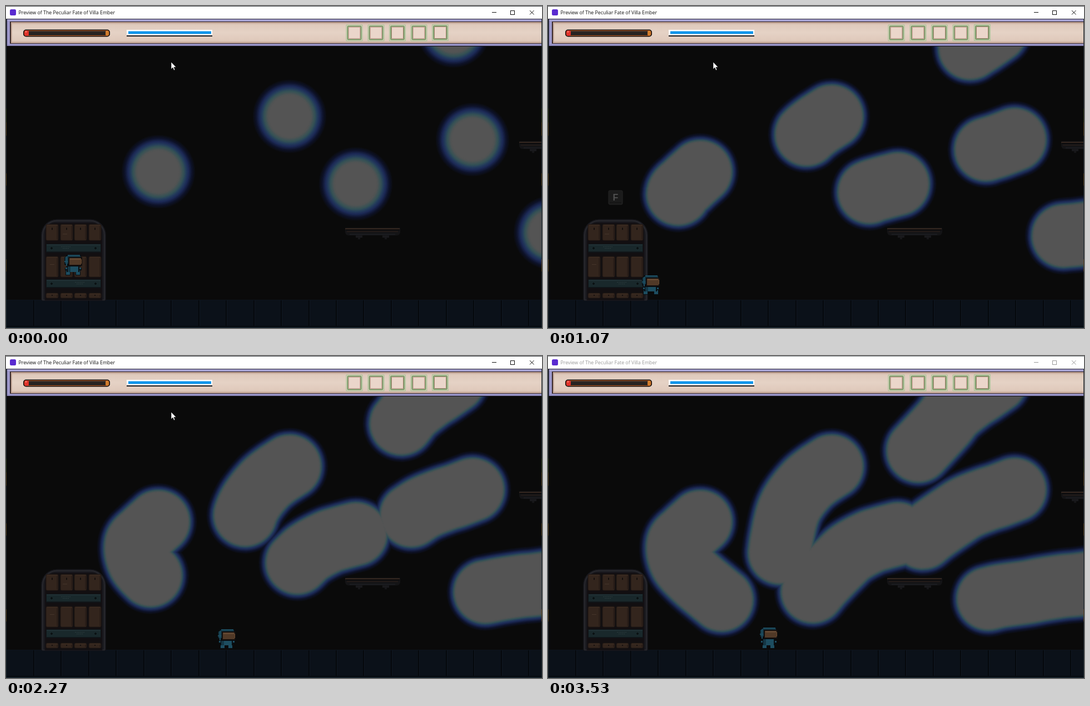
These frames come from a looping animation (964x581 px, 3600 ms). An HTML page with a canvas:

```html
<!DOCTYPE html>
<html lang="en">
<head>
<meta charset="utf-8">
<title>Game preview</title>
<style>
  html, body { margin: 0; width: 100%; height: 100%; overflow: hidden; background: #0a0a0a; }
  canvas { display: block; }
</style>
</head>
<body>
<canvas id="stage" width="964" height="581"></canvas>
<script>
const W = 964, H = 581, LOOP = 3600, STEPS = 54;
const stage = document.getElementById('stage');
let ctx = stage.getContext('2d');

const clamp = (v, lo = 0, hi = 1) => Math.min(hi, Math.max(lo, v));
const mix = (a, b, k) => a + (b - a) * k;

function rect(x, y, w, h, color) {
  ctx.fillStyle = color;
  ctx.fillRect(x, y, w, h);
}

function box(x, y, w, h, radius, fill, line, width = 1) {
  ctx.beginPath();
  ctx.roundRect(x, y, w, h, radius);
  ctx.fillStyle = fill;
  ctx.fill();
  if (!line) return;
  ctx.strokeStyle = line;
  ctx.lineWidth = width;
  ctx.stroke();
}

// ---- Glowing trails ----
const times = [0, 600, 1070, 1730, 2270, 3130, 3530];
const trails = [
  [[274, 299], [250, 321], [234, 339], [239, 371], [260, 396], [296, 427], [312, 440]],
  [[510, 199], [484, 216], [465, 232], [442, 261], [430, 287], [420, 333], [417, 355]],
  [[629, 321], [599, 329], [578, 336], [545, 354], [524, 373], [491, 407], [476, 425]],
  [[839, 241], [810, 252], [788, 259], [753, 273], [729, 288], [690, 315], [674, 328]],
  [[805, 45], [779, 63], [759, 76], [729, 100], [711, 122], [679, 157], [666, 171]],
  [[979, 409], [949, 413], [927, 415], [888, 421], [862, 426], [813, 433], [792, 438]]
];

// Each stop: radius when fresh, radius when saturated, colour.
const glow = [
  [68, 71, [10, 10, 10]],
  [61, 66, [14, 19, 42]],
  [55, 62, [28, 41, 86]],
  [50, 59, [37, 62, 92]],
  [46, 57, [52, 81, 85]],
  [40, 54, [80, 84, 84]],
  [37, 52, [84, 84, 84]]
];

function velocity(p, i, axis) {
  const a = Math.max(i - 1, 0), b = Math.min(i + 1, p.length - 1);
  return (p[b][axis] - p[a][axis]) / (times[b] - times[a]);
}

function along(p, t) {
  let i = 0;
  while (i < times.length - 2 && t > times[i + 1]) i++;
  const span = times[i + 1] - times[i];
  const u = clamp((t - times[i]) / span), u2 = u * u, u3 = u2 * u;
  return [0, 1].map(axis =>
    (2 * u3 - 3 * u2 + 1) * p[i][axis] + (3 * u2 - 2 * u3) * p[i + 1][axis] +
    span * ((u3 - 2 * u2 + u) * velocity(p, i, axis) + (u3 - u2) * velocity(p, i + 1, axis)));
}

function trailPath(t) {
  const path = new Path2D();
  for (const p of trails) {
    path.moveTo(p[0][0] + 0.02, p[0][1]);
    for (let s = 0; s < t; s += 60) path.lineTo(...along(p, s));
    path.lineTo(...along(p, t));
  }
  return path;
}

function drawTrails(t) {
  const path = trailPath(t), settled = 1 - Math.exp(-t / 130);
  ctx.save();
  ctx.beginPath();
  ctx.rect(1, 73, W - 2, 457);
  ctx.clip();
  ctx.lineCap = ctx.lineJoin = 'round';
  for (let i = 0; i < glow.length - 1; i++) {
    const [freshA, fullA, colorA] = glow[i], [freshB, fullB, colorB] = glow[i + 1];
    for (let k = 0.2; k < 1.01; k += 0.2) {
      ctx.lineWidth = 2 * mix(mix(freshA, fullA, settled), mix(freshB, fullB, settled), k);
      ctx.strokeStyle = `rgb(${colorA.map((c, n) => Math.round(mix(c, colorB[n], k)))})`;
      ctx.stroke(path);
    }
  }
  ctx.restore();
}

// ---- Scenery ----
function drawFloor() {
  rect(0, 530, W, 51, '#0b1119');
  rect(0, 530, W, 1, '#0d141d');
  for (let x = 50; x < W; x += 49.45) {
    rect(Math.round(x) - 1, 531, 2, 46, '#05080c');
    rect(Math.round(x) + 1, 531, 1, 46, '#101721');
  }
  rect(0, 577, W, 2, '#070b10');
}

function drawBooks(y, h) {
  for (let i = 0; i < 4; i++) {
    const x = 72 + Math.round(i * 25.5);
    box(x, y, 22, h, 2, '#33251d', '#1e1613');
    rect(x + 2, y + 1, 18, 1, '#3f2e23');
    rect(x + 19, y + 3, 2, h - 5, '#2a1e18');
    if (h < 35) rect(x + 10, y + (h > 15 ? 6 : 3), 2, h > 15 ? 4 : 2, '#15100e');
  }
}

function drawPlank(y, labelX) {
  rect(72, y - 1, 99, 16, '#101518');
  rect(73, y, 97, 13, '#19282b');
  rect(73, y, 97, 2, '#203034');
  for (const x of [80, 159]) {
    rect(x, y + 6, 4, 2, '#0b1113');
    rect(x + 1, y + 5, 2, 4, '#0b1113');
  }
  for (let i = 0; i < 6; i++) rect(labelX + i * 3, y + 4, 2, 1, '#2c3b3d');
  for (let i = 0; i < 4; i++) rect(labelX + 3 + i * 3, y + 7, 2, 1, '#2c3b3d');
}

function drawShelf() {
  box(63.5, 385, 116, 146, [28, 28, 0, 0], '#1c1c21', '#131317');
  box(66, 387.5, 111, 143, [26, 26, 0, 0], '#1a1a1f', '#27272c', 2);
  box(70, 391, 103, 140, [18, 18, 0, 0], '#120f11', '#17151a');
  drawBooks(394, 29);
  drawBooks(452, 37);
  drawBooks(518, 9);
  drawPlank(430, 99);
  drawPlank(494, 124);
  rect(102, 411, 8, 1, '#45352a');
  rect(79, 466, 8, 1, '#45352a');
}

function drawPlatform(x, y) {
  box(x, y, 99, 14, [1, 1, 6, 6], '#141416');
  rect(x, y + 1, 98, 2, '#33261f');
  rect(x + 1, y + 3, 97, 2, '#0c0b0c');
  rect(x + 3, y + 6, 92, 2, '#211a18');
  rect(x + 8, y + 11, 82, 2, '#1b1c20');
  for (const dx of [19, 67]) {
    rect(x + dx, y + 14, 12, 4, '#19191c');
    rect(x + dx + 4, y + 18, 4, 3, '#161618');
  }
}

function drawKeyHint() {
  box(109, 333, 25, 25, 2, '#1b1b1b', '#252525');
  rect(111, 354, 21, 2, '#151515');
  ctx.fillStyle = '#505050';
  ctx.font = 'bold 16px "Liberation Sans", sans-serif';
  ctx.textAlign = 'center';
  ctx.fillText('F', 121.5, 351);
  ctx.textAlign = 'left';
}

// ---- Hero ----
function heroState(t) {
  const land = 600, start = 757, stop = 2107, speed = 0.2045;
  const x = 121 + speed * (clamp(t, start, stop) - start);
  if (t < land) {
    const feet = 486 + 42 * clamp((t - 80) / 520) ** 2;
    return { x, feet, head: feet - 37, pose: 'fall' };
  }
  if (t > start && t < stop) {
    const hop = 3 + 3 * Math.cos(2 * Math.PI * (t - 1070) / 264);
    const feet = 527 - hop;
    return { x, feet, head: feet - 35, pose: 'run', stride: hop > 3 };
  }
  return { x, feet: 528, head: 491.3 + 1.7 * Math.cos(2 * Math.PI * (t - 3130) / 800), pose: 'idle' };
}

function drawHero(t) {
  const { x, feet, head, pose, stride } = heroState(t);
  const suit = '#1d4d60', shade = '#143644', dark = '#080d11';
  const hx = Math.round(x), top = Math.round(head), base = Math.round(feet);
  const part = (dx, y, w, h, color) => rect(hx + dx, y, w, h, color);
  const bodyTop = top + 20, bodyHeight = base - 7 - bodyTop;

  // limbs and body
  const spread = pose === 'fall' ? 2 : 0;
  const left = pose === 'run' && stride ? -13 : -11 - spread;
  const right = pose === 'run' && stride ? 6 : 3 + spread;
  for (const dx of [left, right]) {
    part(dx - 1, base - 9, 9, 9, dark);
    part(dx, base - 9, 7, 8, suit);
  }
  part(-12, bodyTop, 23, bodyHeight + 1, dark);
  part(-10, bodyTop + 1, 19, bodyHeight, suit);
  part(-10, bodyTop + 1, 5, bodyHeight, shade);
  const armY = base - (pose === 'run' ? 13 : 14);
  part(-15, armY, 5, 5, dark);
  part(-14, armY, 3, 3, suit);
  part(10, armY, 5, 5, dark);
  part(11, armY, 3, 3, suit);

  // helmet
  part(-13, top, 27, 21, dark);
  part(-16, top + 4, 30, 14, dark);
  part(-10, top, 22, 2, suit);
  part(-12, top + 2, 25, 3, shade);
  part(-15, top + 4, 6, 12, shade);
  part(-16, top + 11, 6, 2, suit);
  part(-13, top + 3, 2, 17, suit);
  part(-9, top + 4, 25, 16, '#120e0d');
  part(-7, top + 6, 21, 12, '#513927');
  part(-6, top + 6, 19, 3, '#634731');
  part(14, top + 8, 1, 8, '#6a4a30');
}

// ---- Window and status bar ----
function drawTitleBar(active) {
  const ink = active ? '#111' : '#999';
  rect(0, 0, W, 23, '#fff');
  rect(0, 0, W, 1, active ? '#4b4f52' : '#858a8d');
  box(7, 6, 11, 11, 2.5, '#5a2bd0');
  ctx.fillStyle = ink;
  ctx.font = '8.8px "Open Sans", "Noto Sans", sans-serif';
  ctx.fillText('Preview of The Peculiar Fate of Villa Ember', 22.5, 15);
  rect(874, 11, 8, 1, ink);
  ctx.strokeStyle = ink;
  ctx.lineWidth = 1;
  ctx.strokeRect(907.5, 8.5, 7, 7);
  ctx.beginPath();
  ctx.moveTo(942, 8); ctx.lineTo(949.5, 15.5);
  ctx.moveTo(949.5, 8); ctx.lineTo(942, 15.5);
  ctx.stroke();
}

function drawSlot(x, y) {
  box(x - 1, y - 1, 29, 29, 0, '#d6c8b2', '#a7c79a');
  box(x + 1.5, y + 1.5, 24, 24, 1, '#ead4c7', '#5b9455', 1.5);
  box(x + 3, y + 3, 21, 21, 0, '#ebd6ca', '#a67d6c');
}

function drawHud() {
  rect(0, 23, W, 50, '#29253a');
  rect(2, 24, W - 2, 48, '#9d99ca');
  rect(2, 25, W - 2, 1, '#b0acd8');
  rect(2, 70, W - 2, 1, '#8580b4');
  rect(7, 28, W - 7, 40, '#3a2928');
  const paper = ctx.createLinearGradient(0, 29, 0, 67);
  paper.addColorStop(0, '#b99a8a');
  paper.addColorStop(0.12, '#dfcabc');
  paper.addColorStop(0.5, '#e5d2c5');
  paper.addColorStop(0.88, '#dfc9bb');
  paper.addColorStop(1, '#c4a695');
  rect(9, 29, W - 9, 38, paper);
  rect(9, 29, 2, 38, '#c7aa9a');

  // health
  box(31, 42.5, 156, 13, 5, '#120c0a');
  box(33, 44.5, 152, 9, 3, '#2b2522', '#bd602a');
  rect(41, 46, 137, 6, '#272321');
  rect(41, 46, 137, 1, '#3a302a');
  box(33, 44, 8, 10, 3, '#e1322a');
  rect(35, 45, 2, 3, '#f27a68');
  box(179, 44.5, 6, 9, 2, '#cf7b2c');

  // energy
  rect(217, 43, 154, 10, '#fff');
  rect(220, 45.5, 149, 5, '#0c94ea');
  rect(217, 53, 154, 2, '#16161a');

  [613, 652, 690.5, 729, 767.5].forEach((x, i) => drawSlot(x, i === 4 ? 34.5 : 35));
  rect(0, 72, W, 1, '#0b0a10');
}

function drawEdges() {
  for (const x of [0, W - 1]) {
    rect(x, 23, 1, H - 23, '#1a252c');
    rect(x, 185, 1, 25, '#27371c');
    rect(x, 210, 1, 24, '#4a3a1e');
    rect(x, 302, 1, 22, '#4a3a1e');
    rect(x, 457, 1, 22, '#4a3a1e');
  }
  rect(0, H - 1, W, 1, '#1d2c35');
}

// ---- Pointer ----
function pointerAt(t) {
  if (t < 2660) {
    const k = clamp((t - 2330) / 330);
    const e = k * k * (3 - 2 * k);
    return [mix(297, 28, e), mix(101, 505, e)];
  }
  const k = clamp((t - 2660) / 140);
  return [mix(28, 9.5, k), mix(505, 575, k)];
}

function drawPointer(t) {
  if (t > 3300) return;
  const [x, y] = pointerAt(t);
  ctx.save();
  ctx.translate(x, y);
  ctx.beginPath();
  for (const [px, py] of [[0, 0], [0, 13], [3, 10.2], [5, 15], [7, 14.2], [5, 9.6], [9, 9.4]]) ctx.lineTo(px, py);
  ctx.closePath();
  ctx.fillStyle = '#fff';
  ctx.fill();
  ctx.strokeStyle = '#000';
  ctx.lineWidth = 0.6;
  ctx.stroke();
  ctx.restore();
}

function makeLayer(...painters) {
  const layer = document.createElement('canvas');
  layer.width = W;
  layer.height = H;
  const main = ctx;
  ctx = layer.getContext('2d');
  painters.forEach(paint => paint());
  ctx = main;
  return layer;
}

const scenery = makeLayer(
  drawFloor, drawShelf,
  () => drawPlatform(610, 400),
  () => drawPlatform(923, 244),
  drawHud, drawEdges
);

function draw(t) {
  rect(0, 0, W, H, '#0a0a0a');
  drawTrails(t);
  ctx.drawImage(scenery, 0, 0);
  if (t >= 70 && t < 1150) drawKeyHint();
  drawHero(t);
  drawTitleBar(t < 3390);
  drawPointer(t);
}

// The picture advances in even steps rounded to 10 ms.
const stepStart = i => Math.round(i * LOOP / STEPS / 10) * 10;
const origin = performance.now();
let shown = -1;

function tick() {
  const t = (performance.now() - origin) % LOOP;
  let step = Math.min(STEPS - 1, Math.floor((t + 3.4) * STEPS / LOOP));
  if (stepStart(step) > t) step--;
  if (step !== shown) {
    shown = step;
    draw(stepStart(step));
  }
  requestAnimationFrame(tick);
}
tick();
</script>
</body>
</html>
```
